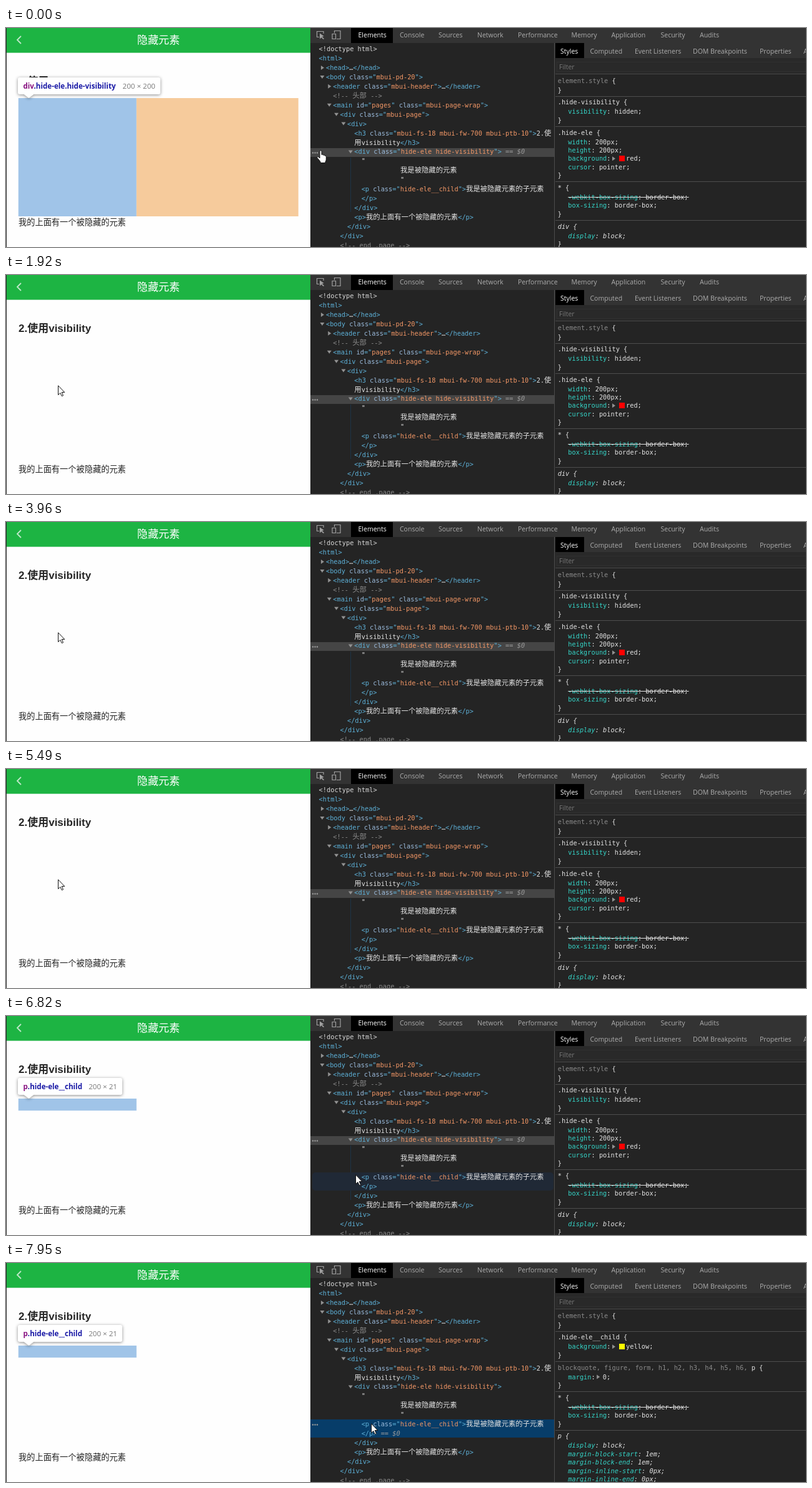
Write an HTML page that moves like this. It is 1280 px wide and 350 px high and loops after 8 s.

```html
<!DOCTYPE html>
<html lang="zh-CN">
<head>
<meta charset="utf-8">
<title>Hidden element inspector</title>
<style>
  html, body { margin: 0; width: 100%; height: 100%; overflow: hidden; background: #fff; }
  svg { display: block; width: 1280px; height: 350px; }
  text { white-space: pre; font-family: "Liberation Sans", "Noto Sans CJK SC", sans-serif; }
  .code { font-family: "DejaVu Sans Mono", "Noto Sans CJK SC", monospace; font-size: 10.3px; }
  .code .han { font-family: "Noto Sans CJK SC", sans-serif; font-size: 11.34px; }
  .ui { font-family: "Open Sans", "Noto Sans", sans-serif; font-size: 10.5px; }
  .tip { font-family: "Open Sans", "Noto Sans", sans-serif; font-size: 11.6px; }
  .italic { font-style: italic; }
  .shadow { filter: drop-shadow(0 1px 2.5px rgba(0,0,0,.45)); }
</style>
</head>
<body>
<svg id="stage" viewBox="0 0 1280 350"></svg>
<script>
const LOOP = 8000, CHAR = 6.2, INDENT = 11.34;
const LIGHT = '#e2e2e2', BLUE = '#5db0d7', CYAN = '#35d4c7', DIM = '#8a8a8a';
const stage = document.getElementById('stage');

// Step tracks: each entry holds from its time until the next one.
const cursorTrack = [
  [0, 497, 195, 'hand'], [400, 486, 197], [520, 476, 198], [1230, 407, 212],
  [1380, 300, 223], [1500, 196, 216], [1650, 128, 194], [1770, 90, 179],
  [1920, 83, 176], [5920, 200, 186], [6040, 349, 197], [6190, 425, 213],
  [6310, 472, 221], [6430, 491, 223], [6580, 520, 231], [6700, 544, 242],
  [6820, 559, 253], [6970, 573, 256], [7090, 584, 256], [7520, 584, 256, 'busy'],
  [7640, 584, 256]
];
const overlayTrack = [[0, 'div'], [400, ''], [6580, 'text'], [6820, 'p']];
const selectTrack = [[0, 0, 0], [3100, 5, 7], [3380, 0, 13], [3960, 0, 0],
  [4800, 5, 7], [4930, 0, 13], [5490, 0, 0]];
const pickTrack = [[0, 'div'], [7950, 'p']];
const at = (track, t) => track.findLast(step => step[0] <= t);

const esc = s => s.replace(/&/g, '&amp;').replace(/</g, '&lt;').replace(/>/g, '&gt;');
const span = (color, s) => `<tspan fill="${color}">` +
  esc(s).replace(/[\u4e00-\u9fff]+/g, han => `<tspan class="han">${han}</tspan>`) + '</tspan>';
const text = (x, y, body, cls, attrs = '') =>
  `<text x="${x}" y="${y}" class="${cls}" ${attrs}>${body}</text>`;
const rect = (x, y, w, h, fill, attrs = '') =>
  `<rect x="${x}" y="${y}" width="${w}" height="${h}" fill="${fill}" ${attrs}/>`;
const path = (d, attrs) => `<path d="${d}" ${attrs}/>`;
const right = (x, y) => path(`M${x} ${y - 3.5}l5 3.5-5 3.5Z`, 'fill="#919191"');
const down = (x, y) => path(`M${x} ${y - 2.5}h7l-3.5 5Z`, 'fill="#919191"');

function tip(y, tag, cls, size, w) {
  return '<g class="shadow">' + rect(19, y, w, 27, '#fff', 'rx="3"') +
    path(`M28 ${y + 26.5}h17l-8.5 6.5Z`, 'fill="#fff"') + '</g>' +
    text(27.5, y + 17.5, span('#881280', tag) + span('#1a1aa6', cls), 'tip', 'font-weight="700"') +
    text(11 + w, y + 17.5, size, 'tip', 'fill="#777" text-anchor="end"');
}

const overlays = {
  '': '',
  div: rect(19.8, 112, 189, 189, '#a0c4e8') + rect(208.8, 112, 259, 189, '#f6cb9c') +
    tip(79, 'div', '.hide-ele.hide-visibility', '200 × 200', 228),
  text: rect(19.8, 112, 106, 19, '#a0c4e8') + tip(79, '#text', '', '112 × 21', 109),
  p: rect(19.8, 132, 189, 19.2, '#a0c4e8') + tip(99, 'p', '.hide-ele__child', '200 × 21', 167)
};

function page(overlay, from, to) {
  const line = '我的上面有一个被隐藏的元素', size = 13.23;
  return rect(0, 0, 487, 350, '#fefefe') + rect(0, 0, 1, 350, '#222') + rect(1, 0, 486, 39.6, '#1db443') +
    path('M24 13l-6 6 6 6', 'fill="none" stroke="#bfe8c9" stroke-width="1.8"') +
    text(244, 24.5, '隐藏元素', '', 'fill="#fff" font-size="17.1" text-anchor="middle"') +
    text(20, 91, '2.使用visibility', '', 'fill="#262626" font-size="17" font-weight="700"') +
    rect(20 + size * from, 303, size * (to - from), 15, '#3390ff') +
    text(20, 315, span('#222', line.slice(0, from)) + span('#fff', line.slice(from, to)) +
      span('#222', line.slice(to)), '', `font-size="${size}"`) +
    overlays[overlay];
}

function toolbar() {
  const tabs = [['Elements', 563.5], ['Console', 630], ['Sources', 692], ['Network', 754],
    ['Performance', 819], ['Memory', 904.5], ['Application', 968.5], ['Security', 1047.5], ['Audits', 1110]];
  const panes = [['Styles', 887], ['Computed', 934.5], ['Event Listeners', 1006],
    ['DOM Breakpoints', 1099], ['Properties', 1206], ['Accessibility', 1276]];
  const labels = (list, y) => list.map(([s, x], i) =>
    text(x, y, s, 'ui', `fill="${i ? '#adadad' : '#fff'}"`)).join('');
  const stroke = 'fill="none" stroke="#a0a0a0" stroke-width="1.2"';
  return rect(487, 0, 793, 24, '#333') + rect(552, 0, 67, 24, '#000') + labels(tabs, 15) +
    path('M501 14.5h-3.5v-9h10.5v3.5', stroke) + path('M502 8.5v9l2.4-2.2 3.6 3 1-1.2-3.3-3 3-1Z', 'fill="#a0a0a0"') +
    path('M525.5 8V4.5h9.5v13h-6M522 9.5h5.5v8h-5.5Z', stroke) +
    rect(878, 24, 402, 24, '#333') + rect(879, 24, 46, 24, '#000') + labels(panes, 41) +
    rect(878, 48, 402, 25, '#292929') + rect(881.5, 54.5, 400, 15, 'none', 'stroke="#303030"') +
    text(885, 66, 'Filter', 'ui', 'fill="#777"') +
    rect(879, 73, 401, 1, '#484848') + rect(877, 24, 1, 326, '#4c4c4c');
}

// Each row: depth, fold marker, markup.
const rows = [
  [0, '', '<!doctype html>'], [0, '', '<html>'], [1, '>', '<head>…</head>'],
  [1, 'v', '<body class="mbui-pd-20">'], [2, '>', '<header class="mbui-header">…</header>'],
  [2, '', '<!-- 头部 -->'], [2, 'v', '<main id="pages" class="mbui-page-wrap">'],
  [3, 'v', '<div class="mbui-page">'], [4, 'v', '<div>'],
  [5, '', '<h3 class="mbui-fs-18 mbui-fw-700 mbui-ptb-10">2.使'], [5, '', '用visibility</h3>'],
  [5, 'v', '<div class="hide-ele hide-visibility">'], [6, '', '"'], [11.5, '', '我是被隐藏的元素'],
  [11.5, '', '"'], [6, '', '<p class="hide-ele__child">我是被隐藏元素的子元素'], [6, '', '</p>'],
  [5, '', '</div>'], [5, '', '<p>我的上面有一个被隐藏的元素</p>'], [4, '', '</div>'], [3, '', '</div>'],
  [3, '', '<!-- end .page -->']
];

const markup = s => s.replace(
  /(<!--.*-->)|(<!.*>)|(<\/?\w+|>)|( [a-z]+)="([^"]*)"|([^<>]+)/g,
  (all, comment, doctype, tag, attr, value) =>
    comment ? span(DIM, all) : doctype ? span('#d8d8d8', all) : tag ? span(BLUE, all) :
    attr ? span('#9bbbdc', attr) + span(BLUE, '="') + span('#f29766', value) + span(BLUE, '"') :
    span(LIGHT, all));

function tree(pick, overlay) {
  const isDiv = pick === 'div', dotY = isDiv ? 199.5 : 258.5, marked = isDiv ? 11 : 16;
  let out = rect(487, 24, 390, 326, '#242424');
  if (isDiv) out += rect(487, 192, 390, 14, '#454545') + rect(551, 207, 1, 87, '#1d3346');
  else out += rect(487, 250, 390, 29, '#073d69');
  if (isDiv && overlay === 'text') out += rect(490, 207, 386, 43, '#202936', 'rx="5"');
  if (isDiv && overlay === 'p') out += rect(490, 250, 386, 29, '#202936', 'rx="5"');
  for (const x of [491, 494.5, 498]) out += `<circle cx="${x}" cy="${dotY}" r="1.2" fill="#999"/>`;
  rows.forEach(([depth, fold, s], i) => {
    const x = 500.6 + INDENT * depth, y = 37.1 + 14.94 * i;
    if (fold) out += fold === 'v' ? down(x - 9.5, y - 3.5) : right(x - 8, y - 3.5);
    const note = i === marked ? '<tspan class="italic" fill="#9a9a9a"> == $0</tspan>' : '';
    out += text(x, y, markup(s) + note, 'code');
  });
  return out;
}

const boxRule = { sel: '*', props: ['!-webkit-box-sizing: border-box;', 'box-sizing: border-box;'] };
const rules = {
  div: [
    { grey: 'element.style', props: [] },
    { sel: '.hide-visibility', props: ['visibility: hidden;'] },
    { sel: '.hide-ele', props: ['width: 200px;', 'height: 200px;', 'background:#red;', 'cursor: pointer;'] },
    boxRule,
    { sel: 'div', italic: true, props: ['display: block;'] }
  ],
  p: [
    { grey: 'element.style', props: [] },
    { sel: '.hide-ele__child', props: ['background:#yellow;'] },
    { grey: 'blockquote, figure, form, h1, h2, h3, h4, h5, h6, ', sel: 'p', props: ['margin:>0;'] },
    boxRule,
    { sel: 'p', italic: true, props: ['display: block;', 'margin-block-start: 1em;',
      'margin-block-end: 1em;', 'margin-inline-start: 0px;', 'margin-inline-end: 0px;'] }
  ]
};

// A leading "!" strikes the line out; "#" adds fold and swatch, ">" only the fold.
function declaration(source, y, cls) {
  const struck = source[0] === '!', s = struck ? source.slice(1) : source, x = 899.3;
  const [name, value] = s.split(':'), end = x + CHAR * (name.length + 1), kind = value[0];
  const label = span(CYAN, name) + span(LIGHT, ':');
  if (kind === ' ') return text(x, y, label + span(LIGHT, value), cls) +
    (struck ? rect(x, Math.round(y - 4), CHAR * s.length + 1, 1, LIGHT) : '');
  const swatch = kind === '#', word = value.slice(1);
  return text(x, y, label, cls) + right(end + 2.5, y - 3.5) +
    (swatch ? rect(Math.round(end + 13.5), Math.round(y - 8), 9, 9, word.slice(0, -1)) : '') +
    text(end + (swatch ? 24.5 : 12), y, span(LIGHT, word), cls);
}

function styles(pick) {
  let out = rect(878, 24, 402, 326, '#242424'), y = 87.5;
  for (const { grey = '', sel = '', italic, props } of rules[pick]) {
    const cls = italic ? 'code italic' : 'code';
    out += text(882.7, y, span(DIM, grey) + span(LIGHT, sel + ' {'), cls);
    props.forEach((p, i) => out += declaration(p, y + 15 + 13.4 * i, cls));
    y += 15 + 13.4 * props.length;
    out += text(882.7, y, span(LIGHT, '}'), cls) + rect(879, Math.round(y + 6), 401, 1, '#4d4d4d');
    y += 19.8;
  }
  return out;
}

function cursor(x, y, kind) {
  const look = 'fill="#fff" stroke="#111" stroke-width="1" stroke-linejoin="round"';
  const shape = kind === 'hand'
    ? path('M5 13V2.3a1.5 1.5 0 0 1 3 0V7.5c1-.8 2.6-.4 2.8 .8c1-.6 2.4-.1 2.5 1c1-.4 2 .3 2 1.4V15c0 2-1.5 3-1.5 5.5H6.5C6 17.5 3 15 1 12.4c-.8-1.2 .8-2.4 2-1.4Z', look)
    : path('M.5 .8V15.6L3.9 12.5 6.3 17.6 8.5 16.7 6.2 11.5H10.8Z', look);
  const ring = kind === 'busy'
    ? '<circle cx="13" cy="1" r="5" fill="none" stroke="#3aa5dc" stroke-width="2.5"/>' : '';
  return `<g transform="translate(${x} ${y})">${shape}${ring}</g>`;
}

const start = performance.now();
let shown;
function draw() {
  const t = (performance.now() - start) % LOOP;
  const [pose, [, overlay], [, from, to], [, pick]] =
    [cursorTrack, overlayTrack, selectTrack, pickTrack].map(track => at(track, t));
  const key = [pose, overlay, from, to, pick].join();
  if (key !== shown) {
    shown = key;
    stage.innerHTML = page(overlay, from, to) + tree(pick, overlay) + styles(pick) +
      toolbar() + cursor(...pose.slice(1));
  }
  requestAnimationFrame(draw);
}
draw();
</script>
</body>
</html>
```
